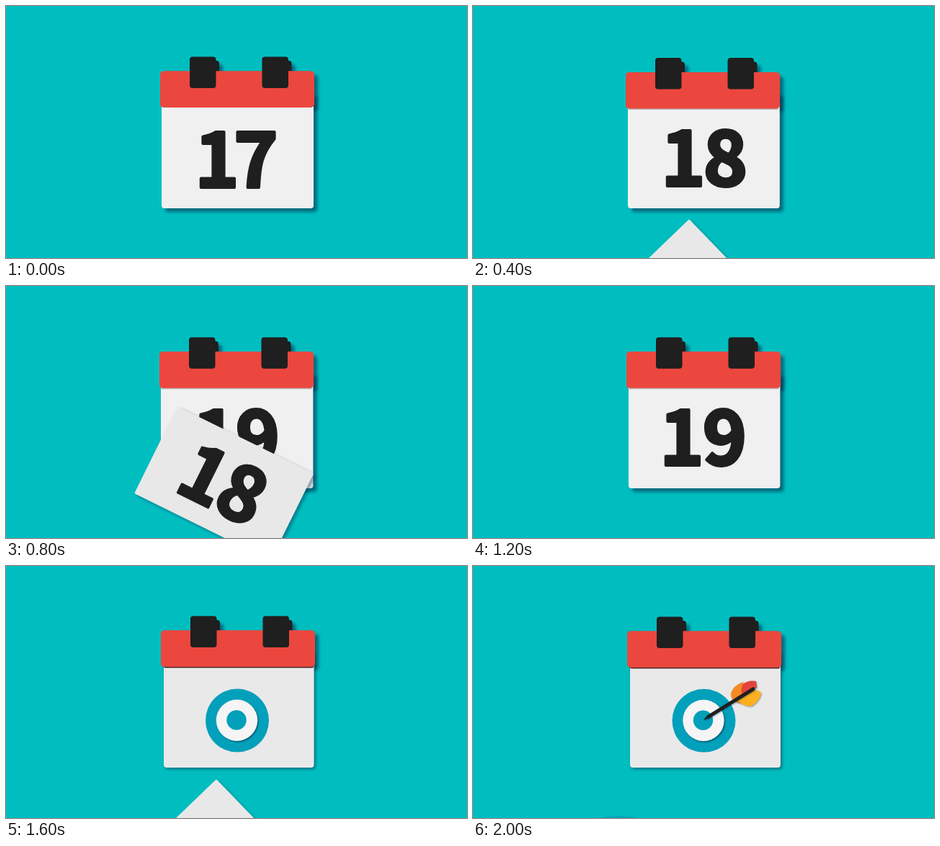
Recreate the animation shown at these times as an HTML page with a canvas. Size 640 by 350 pixels, loop 3 s.

```html
<!DOCTYPE html>
<html lang="en">
<head>
<meta charset="utf-8">
<title>Calendar target</title>
<style>
html, body { margin: 0; width: 100%; height: 100%; overflow: hidden; background: #00bec0; }
canvas { display: block; }
</style>
</head>
<body>
<canvas id="stage" width="640" height="350"></canvas>
<script>
const ctx = document.getElementById('stage').getContext('2d');
const TEAL = '#00bec0', RED = '#eb473e', BLACK = '#1f1f1f', PAPER = '#f0f0f0', SHEET = '#e8e8e8', BLUE = '#02a0ba';
const LOOP = 3000;

// Centres of both digits and their bottom edge
const DIGITS = { 17: [293, 347, 254], 18: [292, 350.5, 252], 19: [290, 349.5, 251] };

// Stop-motion poses: start time, calendar offset, page left edge, page face,
// loose sheet [number, corner x, corner y, degrees], dart offset
const POSES = [
  { t: 0, dx: 0, dy: 0, left: 216, face: 17 },
  { t: 200, dx: -2, dy: 1.5, left: 214, face: 18, sheet: [17, 240, 181, 24.9] },
  { t: 400, dx: -2, dy: 1.5, left: 215, face: 18, sheet: [17, 300, 296, 46] },
  { t: 600, dx: -2, dy: 1.5, left: 215, face: 18 },
  { t: 800, dx: -1, dy: 0.7, left: 215, face: 19, sheet: [18, 238, 167, 26.3] },
  { t: 1000, dx: -1, dy: 0.7, left: 215, face: 19, sheet: [18, 525, 287, 46] },
  { t: 1200, dx: -1, dy: 0.7, left: 216, face: 19 },
  { t: 1400, dx: 1, dy: -1, left: 219, face: 'target', sheet: [19, 243, 178, 25.5] },
  { t: 1600, dx: 1, dy: -1, left: 219, face: 'target', sheet: [19, 292, 296, 46] },
  { t: 1800, dx: 0, dy: 0, left: 218, face: 'target', dart: [166, -116] },
  { t: 1900, dx: 0, dy: 0, left: 218, face: 'target', dart: [83, -58] },
  { t: 2000, dx: 0, dy: 0, left: 218, face: 'target', dart: [0, 0], disc: true }
];

function shadow(offset, blur, alpha) {
  ctx.shadowColor = `rgba(0,50,80,${alpha})`;
  ctx.shadowOffsetX = ctx.shadowOffsetY = offset;
  ctx.shadowBlur = blur;
}

function noShadow() {
  ctx.shadowColor = 'transparent';
}

function box(x, y, w, h, r, color) {
  ctx.fillStyle = color;
  ctx.beginPath();
  ctx.roundRect(x, y, w, h, r);
  ctx.fill();
}

function circle(x, y, r, color) {
  ctx.fillStyle = color;
  ctx.beginPath();
  ctx.arc(x, y, r, 0, Math.PI * 2);
  ctx.fill();
}

function shape(path, color) {
  ctx.fillStyle = color;
  ctx.fill(new Path2D(path));
}

function drawNumber(number) {
  const [first, second, bottom] = DIGITS[number];
  ctx.font = '900 104px "Noto Sans CJK JP", "Noto Sans CJK SC", "Noto Sans CJK", sans-serif';
  ctx.textAlign = 'center';
  ctx.fillStyle = ctx.strokeStyle = BLACK;
  ctx.lineWidth = 4;
  ctx.lineJoin = 'round';
  [...String(number)].forEach((digit, i) => {
    const x = i ? second : first;
    ctx.fillText(digit, x, bottom - 2);
    ctx.strokeText(digit, x, bottom - 2);
  });
}

function drawTarget(x, y) {
  circle(x, y, 44, BLUE);
  shadow(1.5, 2, 0.6);
  circle(x - 0.5, y - 0.3, 28.7, '#f5f5f5');
  noShadow();
  circle(x - 1, y - 0.5, 13.7, BLUE);
}

function drawCalendar({ dx, dy, left, face }) {
  const target = face === 'target';
  shadow(5, 4, 0.6);
  for (const x of [255, 355.5]) box(x + dx + 4, 76 + dy, 37, 30, 4, BLACK);
  box(214 + dx, 90.5 + dy, 214, 50.5, 5, RED);
  shadow(target ? 2 : 5, 4, 0.6);
  box(left, 120, 427 + dx * 0.6 - left, target ? 160 : 161, 4, target ? '#e9e9e9' : PAPER);
  noShadow();
  if (target) drawTarget(320.5 + dx / 2, 214.8 + dy / 4);
  else drawNumber(face);
  if (target) box(218 + dx, 138 + dy, 208, 4.5, 2, '#4a2626');
  else if (dx) box(216 + dx, 139 + dy, 210, 3.5, 2, '#b9b4b4');
  box(214 + dx, 90.5 + dy, 214, 50.5, 5, RED);
  for (const x of [255, 355.5]) box(x + dx, 70.5 + dy, 36.5, 43.5, 4, BLACK);
}

function drawSheet([number, x, y, degrees]) {
  ctx.save();
  ctx.translate(x, y);
  ctx.rotate(degrees * Math.PI / 180);
  shadow(3, 4, 0.45);
  box(0, 0, 211, 135, 2, SHEET);
  noShadow();
  ctx.translate(-216, -143);
  drawNumber(number);
  ctx.restore();
}

function drawDart([x, y]) {
  ctx.save();
  ctx.translate(x, y);
  shadow(1, 2, 0.4);
  shape('M371 191Q357 187 358 177Q361 166 375 161L378 181Z', '#f58a22');
  shape('M374 180Q371 170 375 164Q382 158 393 160L394 169Z', '#e2443e');
  shape('M367 186L390 172Q400 173 400 178Q396 190 386 195Q374 195 367 186Z', '#fcb020');
  shape('M320 214L325 207.5L389 168Q392 169 391 172.5L328 211.5Z', BLACK);
  noShadow();
  ctx.restore();
}

function render(time) {
  const pose = POSES.findLast(p => p.t <= time % LOOP);
  noShadow();
  ctx.fillStyle = TEAL;
  ctx.fillRect(0, 0, 640, 350);
  drawCalendar(pose);
  if (pose.sheet) drawSheet(pose.sheet);
  if (pose.dart) drawDart(pose.dart);
  if (pose.disc) circle(202, 537, 189.5, BLUE);
}

function tick() {
  render(performance.now());
  requestAnimationFrame(tick);
}
tick();
</script>
</body>
</html>
```
